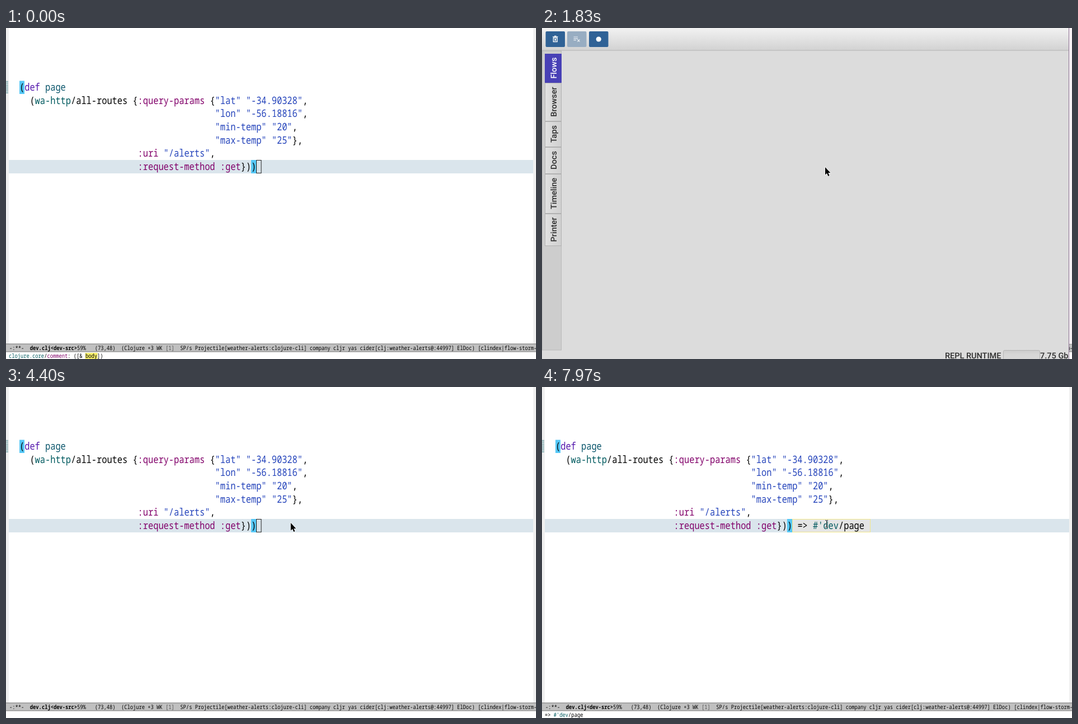
These frames come from a looping animation (947x592 px, 8000 ms). An HTML page:

```html
<!DOCTYPE html>
<html lang="en">
<head>
<meta charset="utf-8">
<title>Editor and debugger</title>
<style>
  html, body { margin: 0; width: 100%; height: 100%; overflow: hidden; background: #fff; }
  svg { display: block; width: 947px; height: 592px; }
  text { white-space: pre; text-rendering: geometricPrecision; }
  .mono { font-family: "Noto Sans Mono", "DejaVu Sans Mono", monospace; fill: #000; }
  .ui { font: 500 14.5px Roboto, "Open Sans", sans-serif; fill: #2e2e2e; }
  .def { fill: #5317ac; }
  .name { fill: #0b566c; }
  .ns { fill: #005a5f; }
  .key { fill: #82006a; }
  .str { fill: #2544bb; }
  .dim { fill: #505050; }
  .bold { font-weight: 700; }
</style>
</head>
<body>
<svg viewBox="0 0 947 592">
  <defs>
    <linearGradient id="bar" x2="0" y2="1">
      <stop stop-color="#f2f2f2"/><stop offset="1" stop-color="#d2d2d2"/>
    </linearGradient>
    <linearGradient id="tab">
      <stop stop-color="#e1e1e1"/><stop offset="1" stop-color="#d0d0d0"/>
    </linearGradient>
    <linearGradient id="meter" x2="0" y2="1">
      <stop stop-color="#cbcbcb"/><stop offset=".4" stop-color="#d6d6d6"/><stop offset="1" stop-color="#d8d8d8"/>
    </linearGradient>
  </defs>

  <!-- Editor -->
  <rect width="947" height="592" fill="#fff"/>
  <path d="M0 0H5V565H0ZM942 0H947V565H942Z" fill="#f0f0f0"/>
  <path data-on="0-5400 6400-8000" d="M2 95V118" stroke="#5f969c" stroke-width="4" stroke-dasharray="1 1.3"/>
  <rect x="5" y="236" width="937" height="24" fill="#dae5ec"/>
  <path d="M24 94.5H33V118H24ZM438 236H447V260H438Z" fill="#56c8f7"/>
  <rect data-on="6400-8000" x="447.5" y="236.5" width="139" height="23" fill="#e5e5e5" stroke="#f1e78c"/>
  <g id="code"></g>
  <g id="result" data-on="6400-8000"></g>
  <rect data-on="0-1200 1700-5130" x="447.5" y="236.5" width="8.5" height="23" fill="none" stroke="#222"/>
  <rect data-on="1200-1700 5130-5930 6430-6930 7400-7930" x="447" y="236" width="9.5" height="24"/>
  <rect x="-.5" y="565" width="948" height="14" fill="#c0c0c0" stroke="#747474"/>
  <g id="mode"></g>
  <g id="help" data-on="0-1200"><rect x="141.5" y="581" width="22" height="11" fill="#f8f06c"/></g>
  <g id="prefix" data-on="5130-6400"></g>
  <g id="chord" data-on="5400-6400"></g>
  <g id="value" data-on="6400-8000"></g>

  <!-- Debugger window -->
  <g data-on="1700-3670">
    <path d="M942 0H947V565H942Z" fill="#f6f0f4"/>
    <rect width="941" height="592" fill="#fff"/>
    <g data-on="1830-3670">
      <rect width="941" height="592" fill="#dcdcdc"/>
      <rect width="941" height="40" fill="url(#bar)"/>
      <path d="M0 40H941" stroke="#b4b4b4"/>
      <rect x=".5" y="41" width="34" height="535" fill="#cdcdcd" stroke="#bababa"/>
      <g id="tabs"></g>

      <rect x="6.5" y="6" width="34.5" height="28" rx="2" fill="#306296"/>
      <g fill="none" stroke="#fff" stroke-width="1.3">
        <path d="M19 15.6H28.500M22 14.500H25.500M20.300 17.500V24.500H27.200V17.500ZM22.300 19.400L25.200 22.500M25.200 19.400L22.300 22.500"/>
      </g>
      <rect x="45" y="6" width="34.500" height="28" rx="2" fill="#98adc2"/>
      <path d="M56.500 16H64M56.500 18.800H64M56.500 21.600H61M63.200 20.300L67.500 24.600M67.500 20.300L63.200 24.600" fill="none" stroke="#e9eef3" stroke-width="1.200"/>
      <g data-on="1830-2800">
        <rect x="84" y="6" width="34.500" height="28" rx="2" fill="#306296"/>
        <circle cx="101.200" cy="20" r="4.600" fill="#fff"/>
      </g>
      <g data-on="2800-3670">
        <rect x="84" y="6" width="34.500" height="28" rx="2" fill="#900880"/>
        <path d="M97.300 15.500H99.800V24H97.300ZM102.300 15.500H104.800V24H102.300Z" fill="#fff"/>
      </g>

      <text class="ui" x="720" y="591">REPL RUNTIME</text>
      <rect x="824.500" y="576.500" width="65" height="17" rx="2" fill="url(#meter)" stroke="#b5b5b5"/>
      <text class="ui" x="940.500" y="591" text-anchor="end">7.75 Gb</text>
    </g>
    <path d="M941.500 0V592" stroke="#8d7193"/>
  </g>

  <!-- Pointer -->
  <g id="pointer">
    <path id="arrow" d="M0 0V13.600L3.100 10.800L5.300 15.900L7.500 14.900L5.300 10.100H9.400Z" stroke="#fff" stroke-width="1.200" paint-order="stroke"/>
    <g id="beam" fill="none">
      <path d="M-4.500 -5.500H-2.500L-2 -5L-1.500 -5.500H.500M-2 -5V6M-4.500 6.500H-2.500L-2 6L-1.500 6.500H.500" stroke="#fff" stroke-width="2.200" opacity=".5"/>
      <path d="M-4.500 -5.500H-2.500L-2 -5L-1.500 -5.500H.500M-2 -5V6M-4.500 6.500H-2.500L-2 6L-1.500 6.500H.500" stroke="#222"/>
    </g>
  </g>
</svg>

<script>
const LOOP = 8000;
const CELL = 9.2, SMALL = 5.265;        // advance of the code font and the status font
const LEFT = 24, TOP = 94.5, ROW = 23.65;
const $ = id => document.getElementById(id);

function add(parent, tag, attrs, content) {
  const el = document.createElementNS("http://www.w3.org/2000/svg", tag);
  for (const name in attrs) el.setAttribute(name, attrs[name]);
  if (content) el.textContent = content;
  return parent.appendChild(el);
}

// A narrow monospaced line; runs alternate between class and text.
function line(parent, x, y, advance, runs, col = 0) {
  const text = add(parent, "text", {
    class: "mono", "font-size": advance / 0.6,
    transform: `translate(${x} ${y}) scale(1 1.2)`
  });
  for (let i = 0; i < runs.length; i += 2) {
    add(text, "tspan", { class: runs[i], x: col * advance }, runs[i + 1]);
    col += runs[i + 1].length;
  }
  return col;
}

const baseline = row => TOP + row * ROW + 17.5;
const codeRows = [
  [0, "", "(", "def", "def", "", " ", "name", "page"],
  [2, "", "(", "ns", "wa-http", "", "/all-routes {", "key", ":query-params", "", " {",
    "str", '"lat" "-34.90328"', "", ","],
  [38, "str", '"lon" "-56.18816"', "", ","],
  [38, "str", '"min-temp" "20"', "", ","],
  [38, "str", '"max-temp" "25"', "", "},"],
  [23, "key", ":uri ", "str", '"/alerts"', "", ","],
  [23, "key", ":request-method :get", "", "}))"]
];
const rowEnds = codeRows.map(([col, ...runs], row) =>
  line($("code"), LEFT, baseline(row), CELL, runs, col));

const value = ["", "=> ", "ns", "#'dev", "", "/page"];
const resultEnd = line($("result"), LEFT, baseline(6), CELL, value, 47) + 1;

line($("mode"), 6, 576, SMALL, [
  "", "-:**-  ", "bold", "dev.clj<dev-src>", "", "59%   (73,48)  (Clojure +3 WK ",
  "dim", "[1]", "", "  SP/s Projectile[weather-alerts:clojure-cli] company cljr yas ",
  "", "cider[clj:weather-alerts@:44997] ElDoc) ", "", "[clindex|flow-storm-"
]);
const echo = (id, runs, col) => line($(id), 5, 590, SMALL, runs, col);
echo("help", ["ns", "clojure.core", "", "/", "key", "comment", "", ": ([& ", "", "body", "", "])"]);
echo("prefix", ["", "C-x"]);
echo("chord", ["", "C-e"], 4);
echo("value", value);

const tabEdges = [46, 98, 167, 213, 261, 332, 390];
["Flows", "Browser", "Taps", "Docs", "Timeline", "Printer"].forEach((label, i) => {
  const y = tabEdges[i], h = tabEdges[i + 1] - y;
  add($("tabs"), "rect", {
    x: 5.5, y: y + 0.5, width: 29, height: h - 1,
    fill: i ? "url(#tab)" : "#4840b6", stroke: i ? "#b1b1b1" : "#4840b6"
  });
  add($("tabs"), "text", {
    class: "ui", "text-anchor": "middle", style: i ? "" : "fill:#fff",
    transform: `translate(26 ${y + h / 2 - 0.5}) rotate(-90)`
  }, label);
});

// Pointer stops: time, x, y
const stops = [
  [30, 676, 592], [400, 30, 104], [830, 285, 249], [870, 285, 249], [930, 506, 249],
  [2230, 506, 249], [2800, 91, 13], [3070, 91, 13], [3280, 111, 27],
  [3670, 111.5, 28], [4430, 510.5, 244], [LOOP, 510.5, 244]
];

function pointerAt(t) {
  const i = Math.max(1, stops.findIndex(s => t < s[0]));
  const [t0, x0, y0] = stops[i - 1], [t1, x1, y1] = stops[i];
  const p = Math.min(1, Math.max(0, (t - t0) / (t1 - t0)));
  const e = p * p * (3 - 2 * p);
  return [x0 + (x1 - x0) * e, y0 + (y1 - y0) * e];
}

function overText(x, y, t) {
  if (t >= 1700 && t < 3670) return false;
  const row = Math.floor((y - TOP) / ROW);
  const end = row === 6 && t >= 6400 ? resultEnd : rowEnds[row];
  return end !== undefined && x < LEFT + end * CELL;
}

const timed = [...document.querySelectorAll("[data-on]")].map(el => ({
  el, spans: el.dataset.on.split(" ").map(s => s.split("-").map(Number))
}));
const show = (el, on) => { el.style.display = on ? "" : "none"; };

function draw(t) {
  for (const { el, spans } of timed) show(el, spans.some(([a, b]) => t >= a && t < b));
  const [x, y] = pointerAt(t);
  const text = overText(x, y, t);
  show($("pointer"), t >= 30);
  show($("arrow"), !text);
  show($("beam"), text);
  $("pointer").setAttribute("transform", `translate(${x} ${y})`);
}

const start = performance.now();
function tick() {
  draw((performance.now() - start) % LOOP);
  requestAnimationFrame(tick);
}
tick();
</script>
</body>
</html>
```
